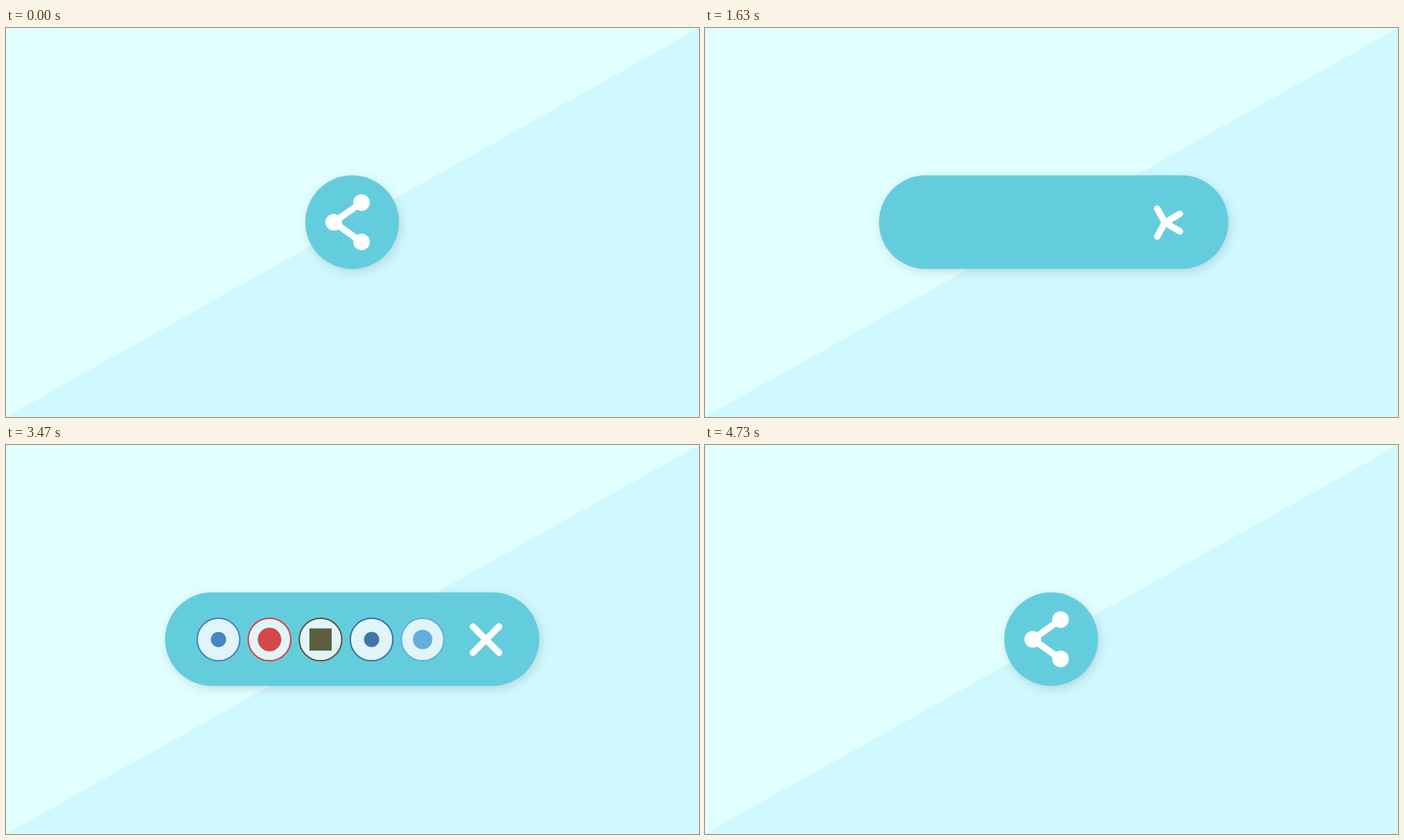
An HTML page that plays this animation: 998 by 561 pixels, repeating every 4800 ms.

```html
<!DOCTYPE html>
<html lang="en">
<head>
<meta charset="utf-8">
<title>Share button</title>
<style>
  html, body { margin: 0; width: 100%; height: 100%; overflow: hidden; background: #e1ffff; }
  svg { display: block; width: 100%; height: 100%; }
  #arms { fill: none; stroke: #fff; stroke-width: 9.4; stroke-linecap: round; stroke-linejoin: round; }
  #dots { fill: #fff; }
  #badges circle.disc { fill: #fff; stroke-width: 2.2; }
</style>
</head>
<body>
<svg viewBox="0 0 998 561" preserveAspectRatio="none">
  <defs>
    <filter id="shadow" filterUnits="userSpaceOnUse" x="150" y="150" width="700" height="260" color-interpolation-filters="sRGB">
      <feDropShadow dx="2.5" dy="4" stdDeviation="7" flood-color="#281e14" flood-opacity=".15"/>
    </filter>
  </defs>
  <path d="M0 561L998 0V561Z" fill="#cff8ff"/>
  <rect id="pill" y="212.5" height="135" rx="67.5" fill="#64cddd" filter="url(#shadow)"/>
  <g id="badges"></g>
  <g id="icon">
    <g id="dots"><circle r="12"/><circle cx="40" cy="-28.4" r="12"/><circle cx="40" cy="28.4" r="12"/></g>
    <path id="arms"/>
  </g>
</svg>
<script>
const $ = id => document.getElementById(id);
const pill = $('pill'), badges = $('badges'), icon = $('icon'), dots = $('dots'), arms = $('arms');

const LOOP = 4800, STEP = 70, OPEN = 1000, OPENED = 2400, CLOSE = 3470;

// Badge colour, size of the plain mark and its corner radius.
const marks = [
  ['#4176bb', 22, 11], ['#ee2a2a', 34, 17], ['#5c441b', 32, 0],
  ['#39629d', 22, 11], ['#64a7de', 28, 14]
];
badges.innerHTML = marks.map(([color, size, r], i) => `
  <g transform="translate(${306 + i * 73.5} 280.5)">
    <circle class="disc" r="30.7" stroke="${color}"/>
    <rect x="${-size / 2}" y="${-size / 2}" width="${size}" height="${size}" rx="${r}" fill="${color}"/>
  </g>`).join('');

const clamp = v => Math.min(1, Math.max(0, v));
const mix = (a, b, p) => a + (b - a) * p;
const span = (t, from, to) => clamp((t - from) / (to - from));

// cubic-bezier(x1, 0, x2, 1)
function ease(x, x1, x2) {
  if (x <= 0 || x >= 1) return clamp(x);
  let lo = 0, hi = 1;
  for (let i = 0; i < 24; i++) {
    const s = (lo + hi) / 2, q = 1 - s;
    if (3 * s * q * q * x1 + 3 * s * s * q * x2 + s * s * s < x) lo = s; else hi = s;
  }
  return lo * lo * (3 - 2 * lo);
}

// The motion advances in even steps and rests while open or closed.
function hold(t) {
  const snap = from => from + Math.floor((t - from) / STEP) * STEP;
  if (t < OPEN) return 0;
  return t < CLOSE ? Math.min(snap(OPEN), OPENED) : snap(CLOSE);
}

function draw(time) {
  const t = hold(time);
  let left, right, move, dotAlpha, badgeAlpha;
  if (t < CLOSE) {
    const x = span(t, 965, 1965);
    left = ease(x, .74, .22);
    right = ease(x, .55, .12);
    move = ease(x, .75, .28);
    dotAlpha = 1 - span(t, 930, 1300);
    badgeAlpha = span(t, 2030, 2400);
  } else {
    left = right = move = 1 - ease(span(t, 3793, 4713), .8, .25);
    dotAlpha = span(t, 4360, 4730);
    badgeAlpha = 1 - span(t, 3400, 3770);
  }

  const x0 = mix(431, 229, left), x1 = mix(566, 768, right);
  pill.setAttribute('x', x0);
  pill.setAttribute('width', x1 - x0);
  icon.setAttribute('transform', `translate(${mix(472, 691.2, move)} ${mix(280.2, 280.7, move)})`);
  dots.setAttribute('opacity', dotAlpha);
  badges.setAttribute('opacity', badgeAlpha);

  // Each share line splits in two; the right halves cross over on the way.
  const arm = (side, end) => `M0 0L${mix(40, end * 18.8, move)} ${side * mix(28.4, -end * 18.8, move)}`;
  arms.setAttribute('d', arm(-1, 1) + arm(1, 1) + arm(-1, -1) + arm(1, -1));
}

let start;
function frame(now) {
  start ??= now;
  draw((now - start) % LOOP);
  requestAnimationFrame(frame);
}
draw(0);
requestAnimationFrame(frame);
</script>
</body>
</html>
```
